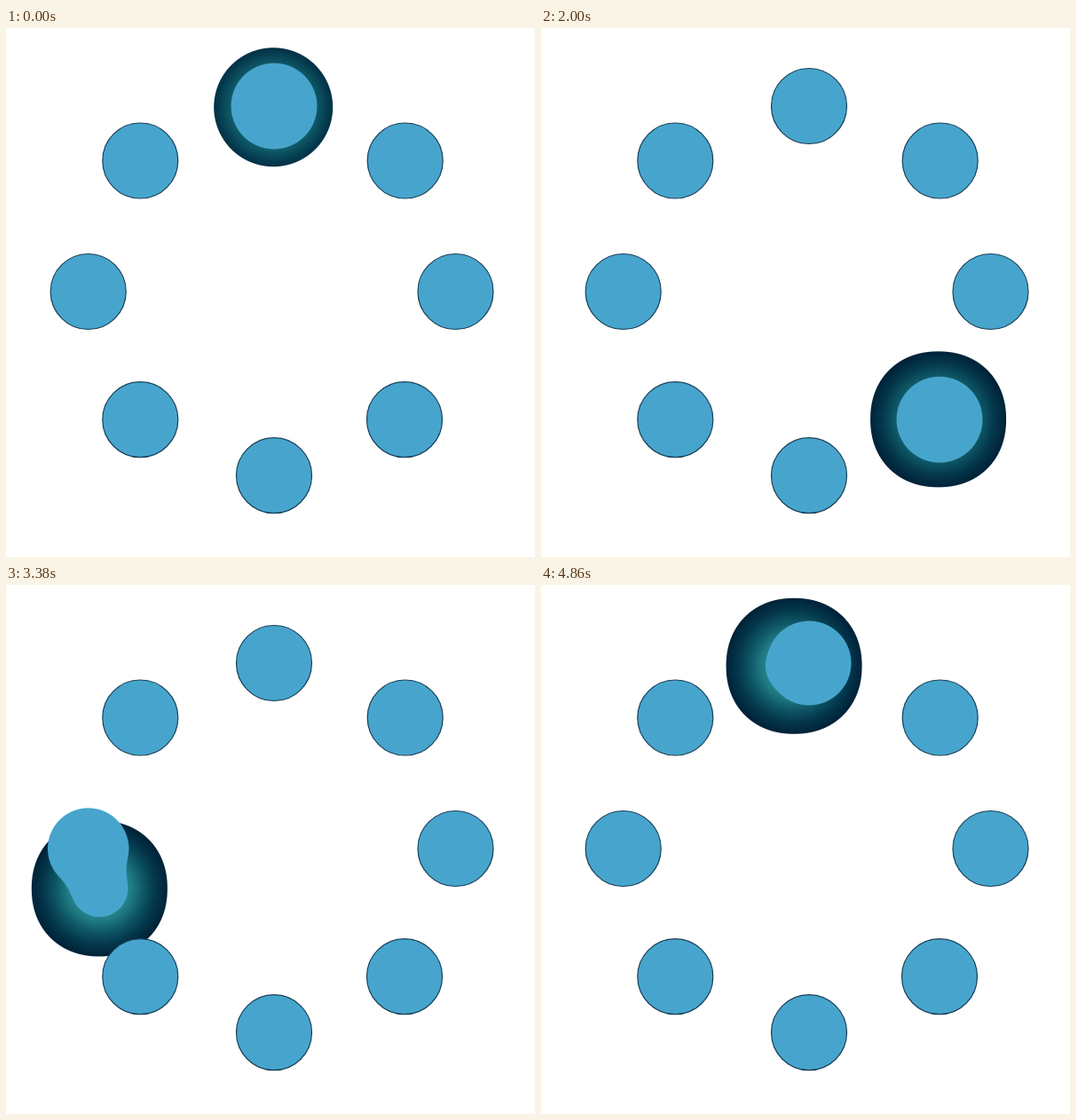
An HTML page with a canvas that plays this animation: 596x596 px, repeating every 4.9 s.

```html
<!DOCTYPE html>
<html lang="en">
<head>
<meta charset="utf-8">
<title>Orbiting blob loader</title>
<style>
  html, body { margin: 0; width: 100%; height: 100%; overflow: hidden; background: #fff; }
  canvas { display: block; }
</style>
</head>
<body>
<canvas id="stage" width="596" height="596"></canvas>
<script>
const ctx = document.getElementById('stage').getContext('2d');
const SIZE = 596, STEPS = 80, LOOP = 4900;
const BLUE = [71, 165, 205], EDGE = '#173f58';
const BALL_R = 42.5, CORE_R = 32, REACH = 92;
const BALLS = [
  [302, 88], [449.7, 149.5], [506.5, 297], [449, 441.2],
  [302, 504.2], [151.3, 441.2], [92.7, 297], [151.3, 149.5]
];

// Each step lasts 40 ms; these ones pause for 140 ms.
const PAUSES = new Set([0, 6, 8, 11, 18, 27, 28, 29, 34, 40, 43, 58, 67, 69, 72, 75, 76]);
const ends = [];
for (let i = 0, sum = 0; i < STEPS; i++) ends.push(sum += PAUSES.has(i) ? 140 : 40);

// Glow colours by distance from the blob centre.
const GLOW = [
  [22, 46, 146, 150], [36, 32, 124, 132], [50, 14, 86, 101],
  [63, 4, 56, 76], [77, 0, 34, 56]
];

const LAYER = 300, HALF = LAYER / 2;
const layer = document.createElement('canvas');
layer.width = layer.height = LAYER;
const lctx = layer.getContext('2d');
const img = lctx.createImageData(LAYER, LAYER);

const clamp = (v, lo, hi) => Math.max(lo, Math.min(hi, v));

function glowColor(r) {
  let i = 1;
  while (i < GLOW.length - 1 && r > GLOW[i][0]) i++;
  const a = GLOW[i - 1], b = GLOW[i];
  const f = clamp((r - a[0]) / (b[0] - a[0]), 0, 1);
  return [1, 2, 3].map(c => a[c] + (b[c] - a[c]) * f);
}
const ramp = Array.from({ length: 100 }, (_, r) => glowColor(r));

// The path dips slightly inward between neighbouring balls.
function blobAt(step) {
  const turn = step / STEPS;
  const angle = turn * 2 * Math.PI;
  const dip = 7.5 * Math.abs(Math.sin(turn * 8 * Math.PI)) ** 1.4;
  return [301.2 + (207 - dip) * Math.sin(angle), 295.2 - (206 - dip) * Math.cos(angle)];
}

function smoothMin(a, b, k) {
  const low = Math.min(a, b);
  if (k <= 0) return low;
  const h = Math.max(k - Math.abs(a - b), 0);
  return low - h * h / (4 * k);
}

function drawBlob(step, bx, by, near) {
  const ox = Math.round(bx) - HALF, oy = Math.round(by) - HALF;
  const glowR = step === 0 ? 67 : 76.5;
  const power = step === 0 ? 2 : 2.15;
  const data = img.data;
  for (let y = 0, p = 0; y < LAYER; y++) {
    for (let x = 0; x < LAYER; x++, p += 4) {
      const px = ox + x + 0.5, py = oy + y + 0.5;
      const dx = Math.abs(px - bx), dy = Math.abs(py - by);
      const dist = Math.hypot(dx, dy);
      let field = dist - CORE_R;
      for (const b of near) {
        field = smoothMin(field, Math.hypot(px - b.x, py - b.y) - b.r, b.k);
      }
      const solid = clamp(0.5 - field, 0, 1);
      let glow = 0;
      if (dx < 79 && dy < 79) {
        const d = (dx ** power + dy ** power) ** (1 / power);
        glow = clamp(glowR - d + 0.5, 0, 1);
      }
      const alpha = solid + glow * (1 - solid);
      data[p + 3] = alpha * 255;
      if (!alpha) continue;
      const tint = ramp[Math.min(99, Math.round(dist))];
      const mix = solid / alpha;
      for (let c = 0; c < 3; c++) data[p + c] = tint[c] + (BLUE[c] - tint[c]) * mix;
    }
  }
  lctx.putImageData(img, 0, 0);
  ctx.drawImage(layer, ox, oy);
}

function drawBall(x, y) {
  ctx.beginPath();
  ctx.arc(x, y, BALL_R, 0, 2 * Math.PI);
  ctx.fillStyle = `rgb(${BLUE})`;
  ctx.fill();
  ctx.lineWidth = 1.2;
  ctx.strokeStyle = EDGE;
  ctx.stroke();
}

function draw(step) {
  ctx.fillStyle = '#fff';
  ctx.fillRect(0, 0, SIZE, SIZE);
  const [bx, by] = blobAt(step);
  const near = [], rest = [];
  for (const [x, y] of BALLS) {
    const d = Math.hypot(x - bx, y - by);
    if (d < REACH) near.push({ x, y, r: 48.5 - 0.06 * d, k: clamp((d - 12) / 2.1, 0, 25) });
    else rest.push([x, y]);
  }
  drawBlob(step, bx, by, near);
  rest.forEach(([x, y]) => drawBall(x, y));
}

const start = performance.now();
let shown = -1;
function tick() {
  const t = (performance.now() - start) % LOOP;
  const step = ends.findIndex(end => t < end);
  if (step !== shown) draw(shown = step);
  requestAnimationFrame(tick);
}
tick();
</script>
</body>
</html>
```
